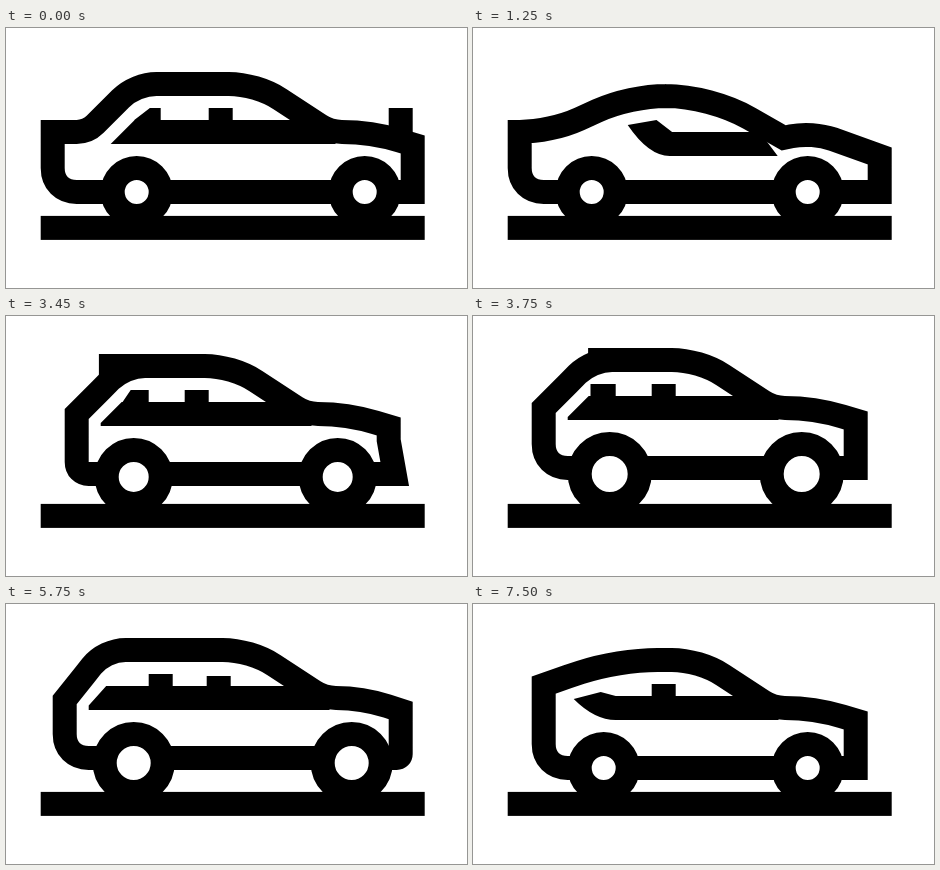
An HTML page for the animation above (8 s loop, 461 by 260 pixels).

```html
<!DOCTYPE html>
<html lang="en">
<head>
<meta charset="utf-8">
<title>Car shapes</title>
<style>
html, body { margin: 0; width: 100%; height: 100%; overflow: hidden; background: #fff; }
svg { display: block; width: 100%; height: 100%; }
#body, circle { fill: #fff; stroke: #000; stroke-width: 2; }
</style>
</head>
<body>
<svg viewBox="0 0 461 260">
  <g transform="translate(34.7 43.9) scale(12)">
    <path id="body"/>
    <path id="parts"/>
    <circle id="rear"/>
    <circle id="front"/>
    <rect y="12" width="32" height="2"/>
  </g>
</svg>
<script>
// One unit is 12 px. The body is a closed line, two units thick,
// through corners [x, y, cut], where cut is how far the rounding reaches.
const HOLD = 750, STEP = 100, STEPS = 6;
const PERIOD = HOLD + (STEPS - 1) * STEP, LOOP = 8000;
const COWL = 5, NOSE = 7;

// Windscreen from x = w on the roof, bonnet and bumper at x = end.
function nose(w, end, top, flare = 0, cut = 0) {
  const cowl = w + 6.1;
  return [
    [w, top, 2.33], [cowl, top + 4, 1],
    [(cowl + end) / 2, top + 4, (end - cowl) / 2 - 1],
    [end, top + 5.05, 0], [end, top + 6.2, 0], [end + flare, top + 9, cut]
  ];
}

// belt: y, floor start, tip x and y, top x and y, end of slope
// seat: back, top, front, height; post: x, height
// wing: left, top, bottom; wheels: rear, front, radius
const car = (body, belt, seat, post, wheels, wing = [8.7, 0, 1], pip = 0) =>
  ({ body, belt, seat, post, wheels, wing, pip });

const cars = [
  car([[1, 10, 2], [1, 5, 0], [3.9, 5, 0.9], [7.9, 1, 1.75], ...nose(18, 31, 1)],
    [5, 5.83, 5.83, 1, 7.83, -1, 10], [7.8, 9.1, 10, 1], [14, 1], [8, 27, 2], undefined, 3.05),
  car([[1, 10, 2], [1, 5, 0], [3.6, 5, 2.6], [10.2, 2, 3], [16.9, 2, 3.75], [23, 5.5, 0],
    [25.4, 5, 1.8], [31, 7, 0], [31, 8.5, 0], [31, 10, 0]],
    [6, 13.5, 10, -1.58, 12.4, -2, 13.7], [14, 14, 15, 0], [15, 0], [7, 25, 2]),
  car([[3, 10, 0], [3, 5, 0], [5, 3, 0], [7, 1, 1.7], ...nose(16, 29, 1, 1)],
    [5, 5, 5, 0.75, 6.75, -1, 8], [6.75, 8.1, 9, 1], [12, 1], [7, 25, 2], [3, 0, 2]),
  car([[3, 9, 2], [3, 4, 0], [5, 2, 0], [7, 0, 1.7], ...nose(16, 29, 0)],
    [4, 5, 5, 0.75, 6.75, -1, 8], [6.9, 6.9, 9, 1], [12, 1], [8.5, 24.5, 2.5], [6.7, -1, 0.5]),
  car([[1, 9, 2], [1, 4, 0], [3, 2, 0], [5, 0, 1.7], ...nose(18, 31, 0)],
    [4, 3, 3, 0.75, 4.75, -1, 8], [9, 9, 11, 1], [14, 1], [7.5, 26.5, 2.5]),
  car([[7, 10, 2], [7, 6, 0], [7, 3.5, 0], [7, 1, 2], ...nose(15, 25, 1, 0, 2)],
    [5, 9, 9, 0, 9, -1, 10], [9, 9, 11, 1], [13, 0], [9, 23, 2]),
  car([[3, 10, 2], [3, 3.1, 0], [5, 2.4, 0], [9.2, 1, 3.3], ...nose(16, 29, 1)],
    [5, 9, 5.5, -0.75, 7.75, -1.33, 9], [9, 9, 11, 0], [12, 1], [8, 25, 2])
];

const $ = id => document.getElementById(id);

function mix(a, b, t) {
  if (typeof a === "number") return a + (b - a) * t;
  if (Array.isArray(a)) return a.map((v, i) => mix(v, b[i], t));
  return Object.fromEntries(Object.keys(a).map(k => [k, mix(a[k], b[k], t)]));
}

function toward([x, y], [tx, ty], dist) {
  const k = dist / Math.hypot(tx - x, ty - y);
  return [x + (tx - x) * k, y + (ty - y) * k];
}

function rounded(points) {
  const n = points.length;
  const corners = points.map((p, i) => {
    const before = points[(i + n - 1) % n], after = points[(i + 1) % n], cut = p[2];
    return `${toward(p, before, cut)} C${toward(p, before, cut * 0.4)} ` +
      `${toward(p, after, cut * 0.4)} ${toward(p, after, cut)}`;
  });
  return `M${corners.join(" L")} Z`;
}

const poly = (...points) => `M${points.join(" L")} Z`;
const box = (x1, y1, x2, y2) => poly([x1, y1], [x2, y1], [x2, y2], [x1, y2]);

function beltPath([y, floor, tipX, tipY, topX, topY, end], right) {
  return `M${right} ${y + 1} L${floor} ${y + 1} ` +
    `Q${(floor + tipX) / 2} ${y + 1} ${tipX} ${y + tipY} ` +
    `L${topX} ${y + topY} L${end} ${y - 1} L${right - 1.5} ${y - 1} Z`;
}

function seatPath([back, top, front, height], y) {
  return poly([back, y], [back, y - 1], [top, y - 1 - height], [front, y - 1 - height], [front, y]);
}

function setWheel(id, x, r) {
  const attrs = { cx: x, cy: 12 - r, r };
  for (const k in attrs) $(id).setAttribute(k, attrs[k]);
}

function draw({ body, belt, seat, post, wheels, wing, pip }) {
  const cowl = body[COWL], tip = body[NOSE], [x, height] = post;
  $("body").setAttribute("d", rounded(body));
  $("parts").setAttribute("d", [
    beltPath(belt, cowl[0] + cowl[2] - 0.5),
    seatPath(seat, belt[0]),
    seatPath([x, x, x + 2, height], belt[0]),
    box(wing[0], wing[1], 8.7, wing[2]),
    box(tip[0] - 2, tip[1] - pip, tip[0], tip[1])
  ].join(" "));
  setWheel("rear", wheels[0], wheels[2]);
  setWheel("front", wheels[1], wheels[2]);
}

function frame(now) {
  const t = now % LOOP, i = Math.floor(t / PERIOD), late = t % PERIOD - HOLD;
  const step = late < 0 ? 0 : Math.floor(late / STEP) + 1;
  draw(mix(cars[i], cars[(i + 1) % cars.length], step / STEPS));
  requestAnimationFrame(frame);
}
frame(0);
</script>
</body>
</html>
```
